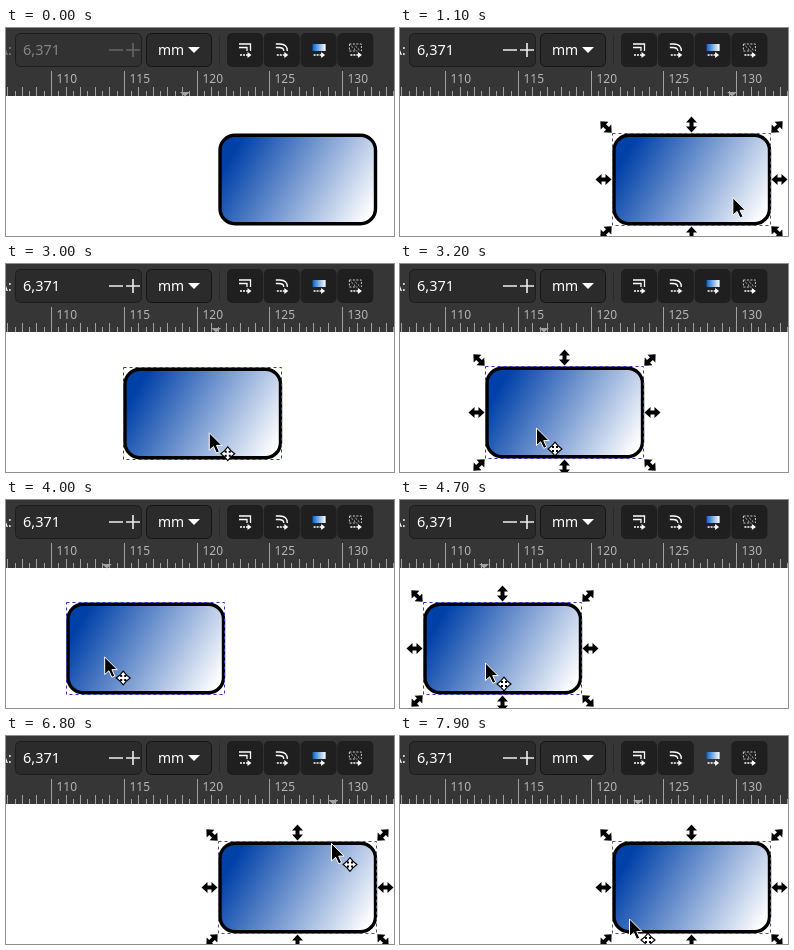
These frames come from a looping animation (388 px wide and 208 px high, 8 s). An HTML page:

```html
<!DOCTYPE html>
<html lang="en">
<head>
<meta charset="utf-8">
<title>Dragging a gradient rectangle</title>
<style>
html, body { margin: 0; width: 100%; height: 100%; overflow: hidden; background: #fff; }
svg { display: block; width: 388px; height: 208px; }
text { font-family: "Noto Sans", "Open Sans", sans-serif; font-size: 14px; }
#value { font-size: 14.5px; }
#ruler text { font-size: 12px; fill: #b4b4b4; }
</style>
</head>
<body>
<svg viewBox="0 0 388 208" xmlns="http://www.w3.org/2000/svg">
  <defs>
    <linearGradient id="fill" gradientUnits="userSpaceOnUse" x1="17" y1="17" x2="146" y2="92">
      <stop offset="0" stop-color="#0041a8"/><stop offset="1" stop-color="#fff"/>
    </linearGradient>
    <linearGradient id="swatch">
      <stop offset="0" stop-color="#0a64c8"/><stop offset="1" stop-color="#fff"/>
    </linearGradient>
    <path id="arrow" d="M-8 0L-2-5.5V-2H2V-5.5L8 0L2 5.5V2H-2V5.5Z"/>
    <path id="move" d="M0-6L2.5-3H1V-1H3V-2.5L6 0L3 2.5V1H1V3H2.5L0 6L-2.5 3H-1V1H-3V2.5L-6 0L-3-2.5V-1H-1V-3H-2.5Z"/>
    <g id="into">
      <path d="M-5 5H3" stroke="#fff" stroke-width="1.6" stroke-dasharray="2 1"/>
      <path d="M2.5 2L6.5 5L2.5 8Z" fill="#fff"/>
    </g>
  </defs>

  <rect width="388" height="208" fill="#fff"/>
  <g id="shape">
    <rect x="2" y="2.2" width="155.5" height="88.5" rx="15" fill="url(#fill)" stroke="#000" stroke-width="3.4"/>
    <g id="picked">
      <rect id="frame" x="0.5" y="0.5" width="158" height="92" fill="none" stroke-dasharray="3 3"/>
      <g id="handles"></g>
    </g>
  </g>

  <rect width="388" height="68" fill="#363636"/>
  <g id="ruler"></g>
  <path id="marker" d="M-5 0H5L0 4.5Z" fill="#a2a2a2"/>

  <text id="label" x="-7" y="27">A:</text>
  <rect id="box" x="9.5" y="5.5" width="126" height="33" rx="5" stroke="#1d1d1d"/>
  <text id="value" x="17" y="27">6,371</text>
  <path id="spin" d="M103 22H117M120 22H134M127 15V29" fill="none" stroke-width="1.6"/>
  <rect x="140.5" y="5.5" width="65" height="33" rx="5" fill="#2b2b2b" stroke="#141414"/>
  <text x="152" y="27" fill="#fff">mm</text>
  <path d="M182 19H194L188 25Z" fill="#fff"/>
  <path d="M213.5 7V37" stroke="#2a2a2a"/>
  <g id="buttons"></g>

  <g id="cursor">
    <path d="M0 0V17.5L4.200 13.800L7.200 20.300L10.200 19L7.200 12.600H12.600Z" fill="#000" stroke="#fff" stroke-linejoin="round"/>
    <use id="cross" href="#move" x="18.500" y="21" fill="#fff" stroke="#000" stroke-width="2.400" paint-order="stroke"/>
  </g>
</svg>
<script>
const $ = id => document.getElementById(id);
const put = (id, x, y) => $(id).setAttribute('transform', `translate(${x} ${y})`);
const show = (id, on) => $(id).setAttribute('visibility', on ? 'inherit' : 'hidden');
const paint = (id, color, attr = 'fill') => $(id).setAttribute(attr, color);
const within = (v, a, b) => v >= a && v < b;

const W = 159, H = 93, HOME = { x: 212, y: 105 };

// static parts
function buildRuler() {
  let ticks = '', labels = '';
  for (let i = -6; i <= 47; i++) {
    const x = Math.floor(45.5 + i * 7.28) + 0.5;
    const top = i % 10 === 0 ? 43 : i % 2 === 0 ? 59 : 63;
    ticks += `M${x} ${top}V68`;
    if (i >= 0 && i % 10 === 0) labels += `<text x="${x + 5}" y="55">${110 + i / 2}</text>`;
  }
  $('ruler').innerHTML = `<path d="${ticks}" stroke="#a0a0a0"/>${labels}`;
}

function buildHandles() {
  let out = '';
  for (const i of [-1, 0, 1]) for (const j of [-1, 0, 1]) {
    if (!i && !j) continue;
    const gap = i && j ? 6 : 8.5;
    const x = W / 2 + i * (W / 2 + gap), y = H / 2 + j * (H / 2 + gap);
    const turn = i && j ? 45 * i * j : j ? 90 : 0;
    out += `<use href="#arrow" transform="translate(${x} ${y}) rotate(${turn})"/>`;
  }
  $('handles').innerHTML = out;
}

function buildButtons() {
  const line = d => `<path d="${d}" fill="none" stroke="#fff" stroke-width="1.3"/>`;
  const icons = [
    line('M-6-6H5.5V1M-6-2.5H2V1'),
    line('M-6-6H-2Q5.5-6 5.5 1M-6-2.5H-3Q2-2.5 2 1'),
    '<rect x="-6" y="-6" width="13" height="7" fill="url(#swatch)"/>',
    '<path d="M-6-6H6V1M-6-6V1H2M-4-4L1 1M0-4L4 0" fill="none" stroke="#ccc" stroke-dasharray="2 1.5"/>'
  ];
  $('buttons').innerHTML = icons.map((icon, i) =>
    `<g transform="translate(${239 + i * 36.8} 22)">
      <rect id="btn${i}" x="-18" y="-17" width="36" height="34" rx="5" fill="#1f1f1f"/>
      ${icon}<use href="#into"/></g>`).join('');
}

// pointer moves: start, end, x, y; it rests in between
const START = { x: 179, y: 240 };
const moves = [
  [0, 200, 244, 240], [300, 400, 262, 150], [400, 600, 308, 161],
  [700, 1300, 346, 174], [1400, 1700, 299, 171],
  [2700, 3100, 172, 168], [3100, 3200, 137, 164], [3200, 3600, 124, 157],
  [3700, 4450, 62, 157], [4450, 4700, 86, 163], [4700, 5500, 361, 240],
  [6300, 7100, 305, 28], [7200, 7500, 310, 22], [7700, 7900, 230, 183]
];
const drags = [
  { grab: 2700, drop: 3100, undo: 6200 },
  { grab: 3700, drop: 4450, undo: 5700 }
];

function pointer(t) {
  let { x, y } = START;
  for (const [from, to, tx, ty] of moves) {
    const f = Math.min(1, Math.max(0, (t - from) / (to - from)));
    x += (tx - x) * f;
    y += (ty - y) * f;
  }
  return { x, y };
}

function shapeAt(t) {
  let { x, y } = HOME;
  for (const { grab, drop, undo } of drags) {
    if (!within(t, grab, undo)) continue;
    const a = pointer(grab), b = pointer(Math.min(t, drop));
    x += b.x - a.x;
    y += b.y - a.y;
  }
  return { x: Math.round(x), y: Math.round(y) };
}

function draw(t) {
  const p = pointer(t), s = shapeAt(t);
  const selected = within(t, 800, 1300) || t >= 2400;
  const dragging = drags.some(d => t > d.grab - 1 && t < d.drop && t > 2700);
  const over = within(p.x, s.x, s.x + W) && within(p.y, s.y, s.y + H);

  put('shape', s.x, s.y);
  put('cursor', p.x - 0.5, p.y);
  put('marker', pointer(t - 20).x, 64);
  show('picked', selected);
  show('handles', !dragging);
  show('cross', over && t > drags[0].grab);
  paint('frame', s.x === HOME.x ? '#55556a' : '#3333c8', 'stroke');

  const ink = selected ? '#fff' : '#858585';
  paint('label', ink);
  paint('value', ink);
  paint('spin', selected ? '#eee' : '#666', 'stroke');
  paint('box', selected ? '#2b2b2b' : '#323232');
  paint('btn2', t >= 7700 ? '#363636' : '#1f1f1f');
}

buildRuler();
buildHandles();
buildButtons();
draw(0);

const STEP = 100, LOOP = 8000;
let start;
function tick(now) {
  start ??= now;
  draw(Math.floor(((now - start) % LOOP) / STEP) * STEP);
  requestAnimationFrame(tick);
}
requestAnimationFrame(tick);
</script>
</body>
</html>
```
